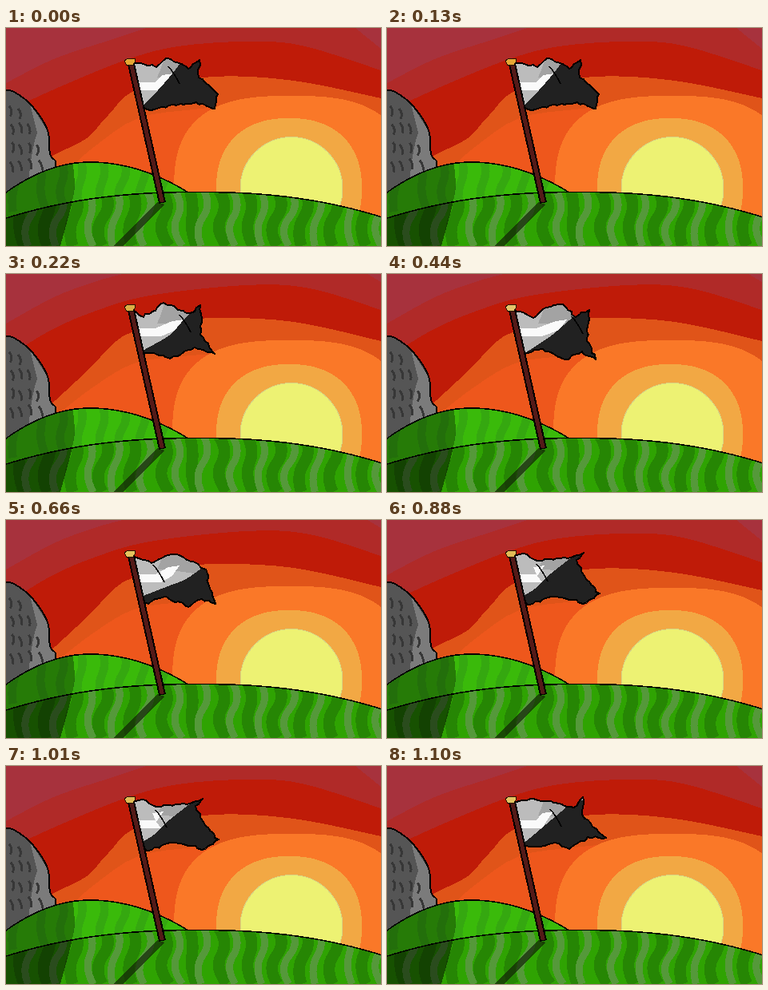
An HTML page for the animation above (1320 ms loop, 469x273 px).

```html
<!DOCTYPE html>
<html lang="en">
<head>
<meta charset="utf-8">
<title>Flag at sunset</title>
<style>
html, body { margin: 0; width: 100%; height: 100%; overflow: hidden; background: #b02a28; }
svg { display: block; width: 100%; height: 100%; }
</style>
</head>
<body>
<svg id="stage" viewBox="0 0 469 273" preserveAspectRatio="none" shape-rendering="crispEdges" fill="none" stroke-linejoin="round"></svg>
<script>
const W = 469, H = 273, STEP = 220, COUNT = 6;
const stage = document.getElementById('stage');

function add(parent, tag, attrs) {
  const el = document.createElementNS('http://www.w3.org/2000/svg', tag);
  for (const k in attrs) el.setAttribute(k, attrs[k]);
  parent.appendChild(el);
  return el;
}
const group = (parent, attrs = {}) => add(parent, 'g', attrs);
const path = (parent, d, fill, extra = {}) => add(parent, 'path', { d, fill, ...extra });
const ink = (parent, d, width = 1.6, stroke = '#000') => path(parent, d, 'none', { stroke, 'stroke-width': width });

function clip(id, d) {
  path(add(stage, 'clipPath', { id }), d);
  return { 'clip-path': `url(#${id})` };
}

function seeded(seed) {
  return () => (seed = (seed * 16807) % 2147483647) / 2147483647;
}

const parse = text => text.split(' ').map(s => s.split(',').map(Number));
const line = points => 'M' + points.join('L');

// Smooth curve through "x,y x,y ..." points
function curve(text) {
  const p = parse(text);
  let d = 'M' + p[0];
  for (let i = 0; i < p.length - 1; i++) {
    const a = p[i - 1] || p[i], b = p[i], c = p[i + 1], e = p[i + 2] || c;
    const h1 = [b[0] + (c[0] - a[0]) / 6, b[1] + (c[1] - a[1]) / 6];
    const h2 = [c[0] - (e[0] - b[0]) / 6, c[1] - (e[1] - b[1]) / 6];
    d += `C${h1} ${h2} ${c}`;
  }
  return d;
}

// Torn outline: straight runs broken into short random nicks
function torn(points, random) {
  const out = [];
  points.forEach((a, i) => {
    const b = points[(i + 1) % points.length];
    const n = Math.max(1, Math.round(Math.hypot(b[0] - a[0], b[1] - a[1]) / 5));
    out.push(a);
    if (i === points.length - 1) return;
    for (let k = 1; k < n; k++)
      out.push([0, 1].map(j => +(a[j] + (b[j] - a[j]) * k / n + (random() - .5) * 3.4).toFixed(1)));
  });
  return line(out) + 'Z';
}

// Boxy ellipse
function glow(cx, cy, rx, ry, power) {
  const bend = v => Math.sign(v) * Math.abs(v) ** (2 / power);
  const points = [];
  for (let a = 0; a < 2 * Math.PI; a += Math.PI / 60)
    points.push([cx + rx * bend(Math.cos(a)), cy + ry * bend(Math.sin(a))]);
  return line(points) + 'Z';
}

// Ridge that falls by `drop` at the given reach on each side
function ridge(cx, top, drop, left, right, power, end) {
  const points = [];
  for (let x = -3; x <= end; x += 3)
    points.push([x, top + drop * Math.abs((x - cx) / (x < cx ? left : right)) ** power]);
  return line(points);
}

// Show an element only during the listed steps of the loop
function showAt(el, steps) {
  const frames = [];
  for (let i = 0; i <= COUNT; i++)
    frames.push({ offset: i / COUNT, opacity: steps.includes(i % COUNT) ? 1 : 0, easing: 'step-end' });
  el.animate(frames, { duration: STEP * COUNT, iterations: Infinity });
}

const SKIES = [
  {
    steps: [0, 4, 5], corners: 'M437 0L469 26V0Z', shift: 2,
    haze: '0,69 62,38 140,12 176,0',
    red: '0,105 62,76 150,40 215,23 300,17 370,22 469,53',
    rust: '40,172 62,158 101,138 128,109 165,77 260,61 360,66 469,88',
    ember: '76,180 110,149 165,113 235,102 300,96'
  },
  {
    steps: [1, 2, 3], corners: 'M452 0L469 10V0Z', shift: 0,
    haze: '0,62 60,29 110,10 146,0',
    red: '0,105 55,71 110,47 180,27 300,14 380,18 469,45',
    rust: '40,177 62,158 104,119 146,78 200,63 260,55 360,60 469,84',
    ember: '62,178 110,141 160,112 220,103 300,98'
  }
];

function drawSky(sky) {
  const g = group(stage);
  const below = (text, color) => path(g, curve(text) + `L${W} ${H}H0Z`, color);
  path(g, `M0 0H${W}V${H}H0Z`, '#b02a28');
  path(g, curve(sky.haze) + 'L0 0Z' + sky.corners, '#a7323d');
  below(sky.red, '#bf1b08');
  below(sky.rust, '#e05419');
  below(sky.ember, '#ee571c');
  path(g, glow(355 + sky.shift, 205 + sky.shift, 147, 122, 2.8), '#fa7828');
  showAt(g, sky.steps);
}

function drawSun() {
  path(stage, glow(354, 201, 91, 88, 2.3), '#f2a844');
  add(stage, 'ellipse', { cx: 357, cy: 201, rx: 64, ry: 64.5, fill: '#edf273', stroke: '#d8d482' });
}

function drawRock() {
  const edge = curve('-2,78 10,80 32,97 52,128 55,158 62,167 62,180');
  const random = seeded(11);
  path(stage, edge + 'L40 215H-2Z', '#555');
  path(stage, 'M30 95L53 130L55 158L62 168V180L28 195Q31 155 39 131Z', '#7b7b7b');
  for (let y = 94; y < 180; y += 23)
    for (let x = 4; x < 18 + (y - 80) / 2 && x < 44; x += 11)
      ink(stage, `M${x + random() * 4} ${y + random() * 8}q5 6 ${random() * 5} 13`, 3, '#373737');
  ink(stage, edge, 2);
}

// Wavy upright blades at even spacing
function blades(g, start, gap, y, width, color, random) {
  for (let x = start; x < W; x += gap) {
    const s = 5 + random() * 8, lean = random() * 12 - 4;
    ink(g, `M${x} ${y}q${s} 18 ${lean / 2} 34t${lean} 36`, width, color);
  }
}

function drawHill(id, top, color, dark, light, shade, y, gap) {
  const shape = top + `V${H + 3}H-3Z`;
  const g = group(stage, clip(id, shape));
  const random = seeded(id.length * 97);
  path(g, shape, color);
  blades(g, 14, gap, y, gap * .4, dark, random);
  if (light) blades(g, 31, gap, y, 9, light, random);
  path(g, `M-3 150H80Q88 190 85 207T67 ${H + 3}H-3Z`, '#000', { opacity: shade });
  return g;
}

function drawHills() {
  const back = ridge(105, 168, 38, 105, 123, 2, 229);
  const front = ridge(240, 205.5, 32, 238, 232, 2.3, W + 3);
  drawHill('back', back, '#3aba0a', '#35a810', '', .34, 160, 26);
  ink(stage, back);
  const g = drawHill('front', front, '#2fa302', '#268604', '#55993a', .5, 203, 36);
  path(g, 'M190 218L198 221L144 276H131Z', '#122008', { opacity: .68 });
  ink(stage, front);
}

// edge: main corners of the cloth; split: where black begins; reach: end of the white band
const POSES = [
  {
    edge: '172,45 188,49 200,38 228,51 242,40 241,62 265,83 261,101 238,93 204,97 182,103',
    split: '169,99 181,88 204,62 219,43', reach: 209, fold: [203, 48], knob: '#e5a735'
  },
  {
    edge: '172,54 183,47 197,36 230,49 243,39 245,56 243,76 261,100 236,92 205,106 185,99',
    split: '169,97 204,77 219,61 240,38', reach: 222, fold: [217, 51], knob: '#dcae46'
  },
  {
    edge: '183,55 199,42 220,38 236,54 253,45 251,66 250,84 261,107 244,97 222,107 195,94',
    split: '168,102 203,79 221,64 247,42', reach: 225, fold: [231, 53], knob: '#e4c36a'
  },
  {
    edge: '182,54 196,47 214,43 240,55 250,62 254,82 262,105 245,99 228,109 198,96 178,105',
    split: '169,96 205,82 225,74 248,58', reach: 217, fold: [184, 56], knob: '#e4c45f'
  },
  {
    edge: '170,42 188,51 226,48 246,41 237,50 249,74 266,92 245,105 232,100 205,96 176,106',
    split: '169,96 185,86 205,67 240,40', reach: 197, fold: [187, 55], knob: '#e1bb56'
  },
  {
    edge: '180,41 208,46 234,52 245,39 244,61 257,76 274,90 251,89 228,104 210,96 186,101',
    split: '169,98 185,85 206,67 230,47', reach: 208, fold: [204, 54], knob: '#e4c361'
  }
];

function drawFlag({ edge, split, reach, fold, knob }, i) {
  const outline = torn([[159, 45], ...parse(edge), [171, 99]], seeded(31 + i));
  const g = group(stage);
  const cloth = group(g, clip('cloth' + i, outline));
  path(cloth, outline, '#bcbcbc');
  path(cloth, 'M189 62L194 50L200 30H270V72L200 62Z', '#a3a3a3');
  path(cloth, `M163 68L187 68L${reach - 14} 59L${reach} 57L${reach - 9} 70L194 78H167Z`, '#fafafa');
  path(cloth, curve(split) + 'L290 30V120H169Z', '#212121');
  ink(cloth, `M${fold}q8 9 14 22`);
  ink(g, outline, 2);
  showAt(g, [i]);

  const cap = path(stage, 'M148 41L151 39L161 38L162 42L159 46L151 47Z', knob, { stroke: '#2a1604' });
  showAt(cap, [i]);
  return cap;
}

SKIES.forEach(drawSky);
drawSun();
drawRock();
drawHills();
const caps = POSES.map(drawFlag);
ink(stage, 'M156.5 45L195.5 219', 9);
ink(stage, 'M156.7 46L195.3 218', 5, '#541a18');
caps.forEach(cap => stage.appendChild(cap));
</script>
</body>
</html>
```
